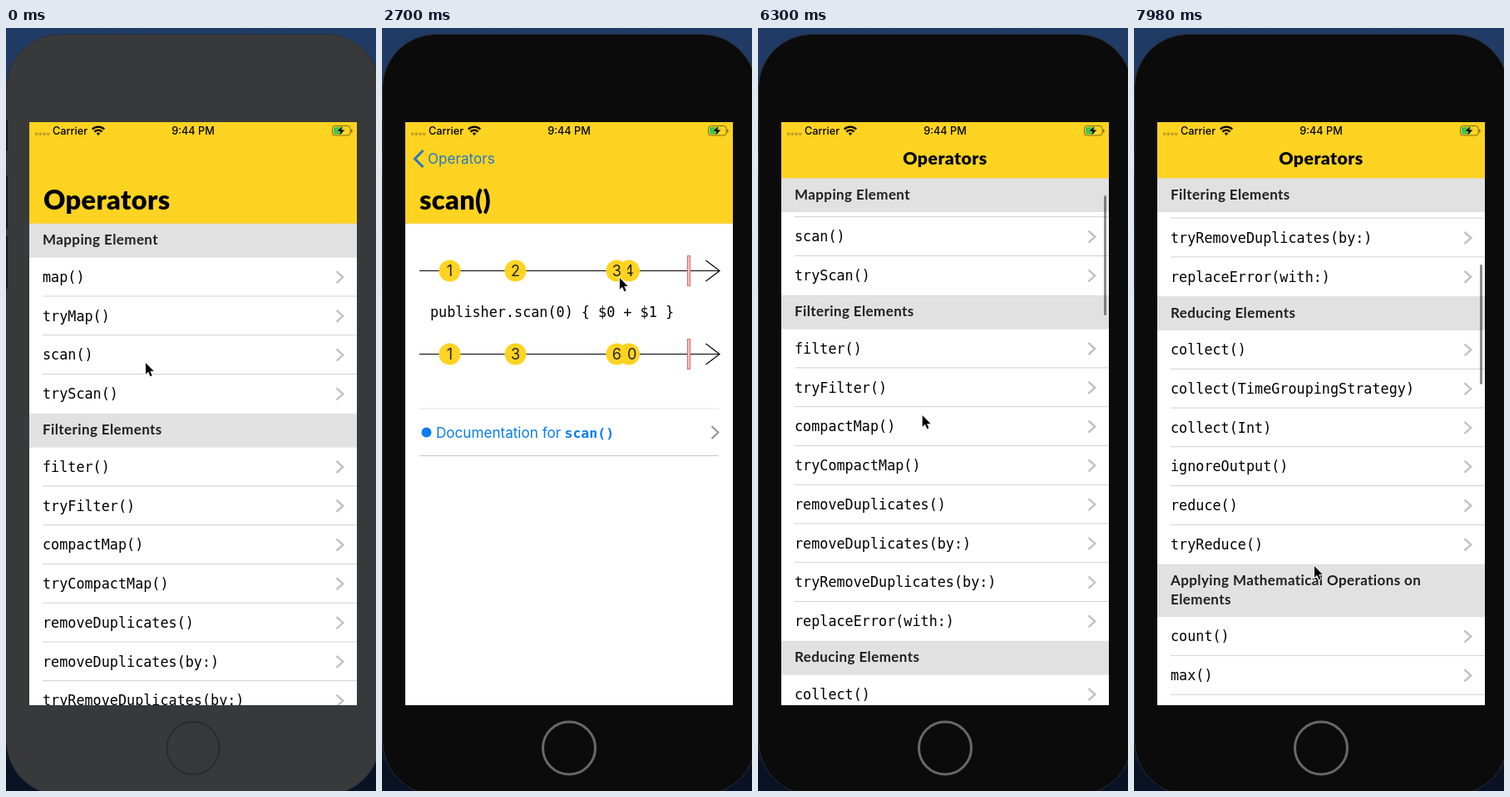
An HTML page that plays this animation: 445 px wide and 916 px high, repeating every 8 s.

```html
<!DOCTYPE html>
<html lang="en">
<head>
<meta charset="utf-8">
<title>Operators</title>
<style>
  html, body { margin: 0; width: 100%; height: 100%; overflow: hidden; background: #0a1226; }
  svg { display: block; width: 445px; height: 916px; }
  text { font-family: Inter, sans-serif; }
  .code { font: 16.8px "DejaVu Sans Mono", monospace; white-space: pre; }
  .head { font: 700 17px Lato, sans-serif; letter-spacing: .4px; fill: #202020; }
  .large { font: 900 32.5px Lato, sans-serif; letter-spacing: .35px; }
  .inline { font: 900 21.3px Lato, sans-serif; letter-spacing: .4px; text-anchor: middle; }
  .status { font-size: 12.7px; font-weight: 500; }
  .link { font-size: 17.1px; fill: #087cf0; }
  .value { font-size: 18px; text-anchor: middle; fill: #222; }
  .line { fill: none; stroke: #000; stroke-width: 1.2; }
  .chevron { fill: none; stroke: #c3c3c6; stroke-width: 2.5; }
</style>
</head>
<body>
<svg viewBox="0 0 445 916" xmlns="http://www.w3.org/2000/svg">
  <defs>
    <linearGradient id="desk" x2="0" y2="1">
      <stop stop-color="#203c66"/><stop offset="1" stop-color="#091124"/>
    </linearGradient>
    <clipPath id="screen"><rect x="28" y="113" width="394" height="700"/></clipPath>
  </defs>
  <rect width="445" height="916" fill="url(#desk)"/>
  <rect id="body" x=".5" y="7.5" width="449" height="913" rx="65" stroke="#2b2e35"/>
  <path d="M.5 111v36M.5 177v64M.5 250v63" stroke="#17181b" stroke-width="3"/>
  <circle id="home" cx="225" cy="864.5" r="31.5" fill="none"/>

  <g clip-path="url(#screen)">
    <rect x="28" y="113" width="394" height="700" fill="#fff"/>
    <g id="list">
      <g id="rows"></g>
      <g id="heads"></g>
      <rect id="indicator" x="416" width="3" height="144" rx="1.5" fill="#000" fill-opacity=".45"/>
    </g>
    <rect id="dim" x="28" y="113" width="394" height="700"/>
    <g id="detail">
      <rect x="28" y="180" width="394" height="633" fill="#fff"/>
      <g id="streams"></g>
      <text class="code" x="58" y="347">publisher.scan(0) { $0 + $1 }</text>
      <path d="M45 457H405" stroke="#e3e3e3"/>
      <path d="M45 513.5H405" stroke="#c6c6c6"/>
      <circle cx="53.5" cy="485.5" r="6" fill="#087cf0"/>
      <text class="link" x="65" y="491.5">Documentation for</text>
      <text class="code link" x="219.5" y="491.5" style="font-size:16.5px;font-weight:700">scan()</text>
      <path class="chevron" d="M396.5 478l8 7.5-8 7.5" style="stroke:#8e8e8e;stroke-width:1.8"/>
    </g>

    <rect id="nav" x="28" y="113" width="394" fill="#ffd321"/>
    <text id="listTitle" class="large" x="45" y="218">Operators</text>
    <text id="detailTitle" class="large" x="45" y="218">scan()</text>
    <rect x="28" y="113" width="394" height="67" fill="#ffd321"/>
    <path id="navEdge" d="M28 0H422" stroke="#d9c27a" stroke-width=".5"/>
    <text id="inlineTitle" class="inline" x="225" y="163.5">Operators</text>
    <g id="back">
      <path d="M49.5 147L39.5 157l10 10" fill="none" stroke="#2878c4" stroke-width="3"/>
      <text id="backLabel" x="55" y="163" font-size="17.1" fill="#2878c4">Operators</text>
    </g>

    <path d="M35 127.3H53" stroke="#bd9b24" stroke-width="3" stroke-dasharray="3.4 1.3"/>
    <text class="status" x="56" y="127.6">Carrier</text>
    <g fill="none" stroke="#000" stroke-width="2.2">
      <path d="M103.8 121.6a10.3 10.3 0 0 1 14.4 0M106.4 124.6a6.5 6.5 0 0 1 9.2 0"/>
      <path d="M111 129l-2.3-2.5a3.4 3.4 0 0 1 4.6 0z" fill="#000" stroke="none"/>
    </g>
    <text class="status" x="225" y="127.6" text-anchor="middle">9:44 PM</text>
    <rect x="392.5" y="117.5" width="21.5" height="11.5" rx="3" fill="none" stroke="#806a18"/>
    <path d="M415.7 121.5v4" stroke="#806a18" stroke-width="1.5"/>
    <rect x="394" y="119" width="11" height="8.5" rx="1.5" fill="#35c75a"/>
    <path d="M405.2 117.3l-7.4 6.8h4.4l-1.9 5.2 7.6-7.1h-4.4z" stroke="#ffd321" stroke-width=".5"/>
  </g>
  <path id="cursor" d="M0 0V13.8l3.2-3 2.3 5.4 2.2-.9-2.3-5.2h4.4z"
        stroke="#fff" stroke-width="1.6" paint-order="stroke"/>
</svg>

<script>
const LOOP = 8000, STEP = 60;
const PUSH = 300, POP = 4740;
const ROW = 46.76, TOP = 234.8, BAR = 180.2;

const $ = id => document.getElementById(id);
const clamp = v => Math.max(0, Math.min(1, v));
const move = (node, x, y) => node.setAttribute('transform', `translate(${x} ${y})`);
const set = (node, attrs) => Object.entries(attrs).forEach(([k, v]) => node.setAttribute(k, v));

function add(parent, tag, attrs, content = '') {
  const node = document.createElementNS('http://www.w3.org/2000/svg', tag);
  set(node, attrs);
  node.textContent = content;
  parent.append(node);
  return node;
}

// Easings
const linear = u => u;
const smooth = u => u * u * (3 - 2 * u);
const glide = u => 1 - (1 - u) ** 3;
const spring = ms => ms <= 0 ? 0 : 1 - (1 + ms * .014) * Math.exp(-ms * .014);

// Each key is [time, value, easing towards this key].
function track(keys, t) {
  const i = keys.findIndex(k => k[0] > t);
  if (i === 0) return keys[0][1];
  if (i < 0) return keys[keys.length - 1][1];
  const [t0, v0] = keys[i - 1], [t1, v1, ease = smooth] = keys[i];
  return v0 + (v1 - v0) * ease((t - t0) / (t1 - t0));
}

const pointerX = [[480, 168], [1440, 232], [1500, 232], [1740, 221.5], [1860, 221.5], [3420, 337],
  [3960, 337], [4560, 110], [5280, 110], [5880, 196], [6840, 200, linear], [7500, 215], [7980, 217]];
const pointerY = [[480, 402], [1440, 290], [1500, 290], [1740, 300], [3960, 300], [4560, 165],
  [5280, 165], [5880, 607], [5940, 607], [6300, 465, linear], [6780, 267, linear], [6840, 244, linear],
  [7500, 688], [7680, 688], [7980, 646]];
const scrollKeys = [[5940, 0], [6300, 142, linear], [6780, 343, linear], [6840, 368, linear],
  [7680, 513, glide], [7980, 555.6]];
const marbleX = [[1860, 218], [3420, 333.5]];

const sections = [
  [['Mapping Element'], 'map() tryMap() scan() tryScan()'],
  [['Filtering Elements'], 'filter() tryFilter() compactMap() tryCompactMap() removeDuplicates() ' +
    'removeDuplicates(by:) tryRemoveDuplicates(by:) replaceError(with:)'],
  [['Reducing Elements'], 'collect() collect(TimeGroupingStrategy) collect(Int) ignoreOutput() reduce() tryReduce()'],
  [['Applying Mathematical Operations on', 'Elements'], 'count() max() min()'],
];

let highlight;
function buildList() {
  let y = TOP;
  return sections.map(([titles, names]) => {
    const head = { y, height: titles.length > 1 ? 63.5 : 40.9, node: add($('heads'), 'g', {}) };
    add(head.node, 'rect', { x: 28, width: 394, height: head.height, fill: '#e1e1e1' });
    titles.forEach((title, i) => add(head.node, 'text', { class: 'head', x: 44, y: 25.5 + 23 * i }, title));
    y += head.height;
    names.split(' ').forEach((name, i, all) => {
      if (name === 'scan()')
        highlight = add($('rows'), 'rect', { x: 28, y, width: 394, height: ROW, fill: '#d9d9d9' });
      const mid = y + ROW / 2;
      add($('rows'), 'text', { class: 'code', x: 44, y: mid + 5.8 }, name);
      add($('rows'), 'path', { class: 'chevron', d: `M397.5 ${mid - 7}l7.8 7-7.8 7` });
      y += ROW;
      if (i < all.length - 1)
        add($('rows'), 'rect', { x: 44, y: y - .9, width: 378, height: .8, fill: '#c6c6c6' });
    });
    return head;
  });
}

function buildStream(y) {
  const group = add($('streams'), 'g', { transform: `translate(0 ${y})` });
  add(group, 'path', { class: 'line', d: 'M45 0H406M389.5-12.5L406 0 389.5 12.5' });
  add(group, 'rect', { x: 367.5, y: -18, width: 3, height: 36, fill: '#f6c3c1', stroke: '#d96b69' });
  return [1, 2, 4, 3].map(() => {
    const node = add(group, 'g', {});
    add(node, 'circle', { r: 13, fill: '#ffd321' });
    return { node, label: add(node, 'text', { class: 'value', y: 6.4 }) };
  });
}

const heads = buildList();
const input = buildStream(291.5), output = buildStream(391.5);

function drawMarbles(t) {
  const marbles = [[81.5, 1], [160.5, 2], [297, 4], [track(marbleX, t), 3]];
  marbles.forEach(([x, value], i) => {
    const sum = marbles.reduce((total, [px, v]) => total + (px <= x ? v : 0), 0);
    move(input[i].node, x, 0);
    move(output[i].node, x, 0);
    input[i].label.textContent = value;
    output[i].label.textContent = sum;
  });
}

function drawList(t, scroll, edge) {
  move($('rows'), 0, -scroll);
  heads.forEach((head, i) => {
    const next = heads[i + 1];
    const limit = next ? next.y - scroll - head.height : Infinity;
    move(head.node, 0, Math.min(limit, Math.max(edge, head.y - scroll)));
  });
  set($('indicator'), { y: 201 + (scroll - 142) * .2 + edge - BAR, opacity: clamp((t - 5940) / 120) });
}

function drawNavigation(t, scroll, edge) {
  const shown = t < POP ? spring(t - PUSH) : 1 - spring(t - POP);
  move($('list'), -118 * shown, 0);
  move($('detail'), 394 * (1 - shown), 0);
  set($('dim'), { opacity: .1 * shown });
  set(highlight, { opacity: t < 180 ? 0 : t < POP ? 1 : shown });

  set($('nav'), { height: edge - 113 });
  move($('navEdge'), 0, edge);
  move($('listTitle'), -118 * shown, -scroll);
  set($('listTitle'), { opacity: clamp(1 - 2 * shown) * (scroll > 55 ? 0 : 1) });
  move($('detailTitle'), 394 * (1 - shown), 0);
  set($('detailTitle'), { opacity: shown });
  set($('inlineTitle'), { opacity: clamp((scroll - 35) / 20) });
  set($('back'), { opacity: shown });
  move($('backLabel'), 90 * (1 - shown), 0);
}

function draw(t) {
  const active = t >= 60;
  const scroll = track(scrollKeys, t);
  const edge = Math.max(BAR, TOP - scroll);
  set($('body'), { fill: active ? '#0b0b0b' : '#38393b' });
  set($('home'), { stroke: active ? '#686868' : '#2a2b2d', 'stroke-width': active ? 3 : 2 });
  drawList(t, scroll, edge);
  drawMarbles(t);
  drawNavigation(t, scroll, edge);
  move($('cursor'), track(pointerX, t), track(pointerY, t));
}

const start = performance.now();
function tick() {
  const t = (performance.now() - start) % LOOP;
  draw(Math.floor(t / STEP) * STEP);
  requestAnimationFrame(tick);
}
tick();
</script>
</body>
</html>
```
